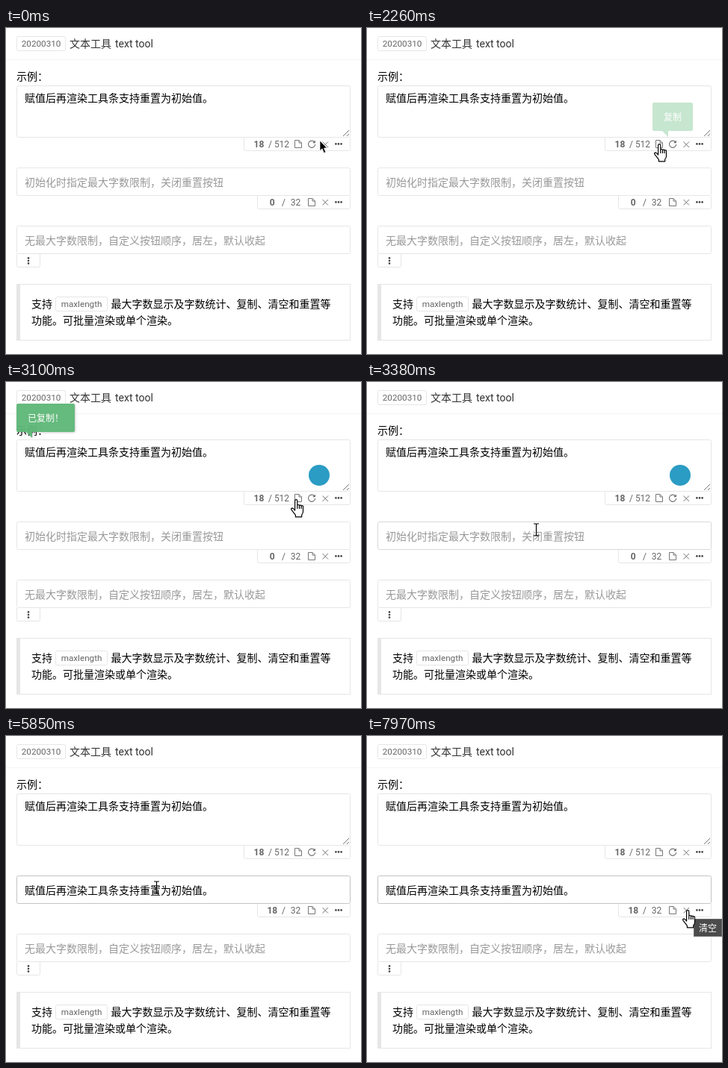
An HTML page that plays this animation: 475x437 px, repeating every 8 s.

```html
<!DOCTYPE html>
<html lang="zh-CN">
<head>
<meta charset="utf-8">
<title>文本工具</title>
<style>
html, body { margin: 0; width: 100%; height: 100%; overflow: hidden; background: #fff; }
svg { display: block; width: 475px; height: 437px; font: 14px "Noto Sans CJK SC", "Noto Sans CJK", sans-serif; }
.box { fill: none; stroke: #e6e6e6; }
.latin { font-family: Roboto, sans-serif; }
.tag { font: 11.7px Roboto, sans-serif; fill: #666; }
.num { font: 12px Roboto, sans-serif; fill: #666; text-anchor: middle; }
.bold { font-weight: 700; }
.hint { fill: #999; }
.small { font-size: 12px; fill: #fff; }
.icon { fill: none; stroke: #777; }
.dots { fill: #444; }
.tip { fill: #5fb878; }
.shade { filter: drop-shadow(1px 1px 1.5px rgba(0, 0, 0, .2)); }
</style>
</head>
<body>
<svg viewBox="0 0 475 437">
  <defs>
    <path id="file" class="icon" d="M.5.5H6L9.5 4V10.5H.5ZM6 .5V4H9.5"/>
    <g id="reset"><path class="icon" stroke-width="1.2" d="M8.8 3A4.6 4.6 0 1 0 9.7 6"/><path fill="#666" d="M9.8 .6V4.3H6.2Z"/></g>
    <path id="clear" class="icon" d="M.5.5L8 8M8 .5L.5 8"/>
    <g id="more" class="dots"><circle cx="1.4" cy="1.4" r="1.3"/><circle cx="5" cy="1.4" r="1.3"/><circle cx="8.6" cy="1.4" r="1.3"/></g>
    <path id="arrow" fill="#000" stroke="#fff" stroke-width=".7" d="M0 0V13.6L3.1 10.8 5.4 16.4 7.8 15.4 5.5 10H9.6Z"/>
    <path id="hand" fill="#fff" stroke="#000" stroke-width="1.2" stroke-linejoin="round" d="M5.6 2.2a1.6 1.6 0 0 1 3.2 0V8.4a1.4 1.4 0 0 1 2.7.4a1.4 1.4 0 0 1 2.6.7a1.3 1.3 0 0 1 2.4 1V16.5q0 2.6-1.8 4.4V23.8H6.4V21.4L1 14.4q-1-1.8.4-2.3q1.4-.3 2.6 1L5.6 15ZM8.8 8.4V13M11.5 9V13M14.1 9.6V13"/>
    <path id="beam" fill="none" stroke="#000" stroke-width="1.2" d="M-3.5-8H-1Q0-8 0-7Q0-8 1-8H3.5M0-7V7M-3.5 8H-1Q0 8 0 7Q0 8 1 8H3.5"/>
  </defs>
  <rect width="475" height="437" fill="#fff"/>

  <path stroke="#f5f5f5" d="M0 42.5H475"/>
  <rect class="box" x="14.5" y="11.5" width="65" height="19" rx="2"/>
  <text class="tag" x="20.8" y="25.4">20200310</text>
  <text x="85" y="26" fill="#333">文本工具 <tspan class="latin" x="146">text tool</tspan></text>
  <text x="14" y="70">示例：</text>

  <rect class="box" x="14.5" y="77.5" width="446" height="69" rx="2"/>
  <text x="25" y="99">赋值后再渲染工具条支持重置为初始值。</text>
  <path stroke="#777" d="M451 145L459 137M456 145L459 142"/>
  <path class="box" d="M318.5 147V162.5Q318.5 164.5 320.5 164.5H458.5Q460.5 164.5 460.5 162.5V147"/>
  <text class="num bold" x="338.5" y="160">18</text>
  <text class="num" x="353.5" y="160">/</text>
  <text class="num" x="369" y="160">512</text>
  <use href="#file" x="386" y="150"/>
  <use href="#reset" x="404" y="150"/>
  <use href="#clear" x="423" y="152"/>
  <use href="#more" x="440" y="154"/>

  <rect id="field" class="box" x="14.5" y="187.5" width="446" height="37" rx="2"/>
  <text id="value" x="25" y="212"></text>
  <path id="caret" stroke="#000" d="M0 198V215"/>
  <path class="box" d="M336.5 225V240.5Q336.5 242.5 338.5 242.5H458.5Q460.5 242.5 460.5 240.5V225"/>
  <text id="count" class="num bold" x="356.3" y="238"></text>
  <text class="num" x="371.5" y="238">/</text>
  <text class="num" x="387.5" y="238">32</text>
  <use href="#file" x="404" y="228"/>
  <use href="#clear" x="423" y="229.5"/>
  <use href="#more" x="440" y="232"/>

  <rect class="box" x="14.5" y="265.5" width="446" height="37" rx="2"/>
  <text class="hint" x="25" y="290">无最大字数限制，自定义按钮顺序，居左，默认收起</text>
  <path class="box" d="M14.5 303V318.5Q14.5 320.5 16.5 320.5H43.5Q45.5 320.5 45.5 318.5V303"/>
  <use href="#more" transform="translate(31.4 307) rotate(90)"/>

  <rect class="box" x="14.5" y="343.5" width="446" height="75"/>
  <rect x="14" y="343" width="5" height="76" fill="#e6e6e6"/>
  <text x="34" y="375">支持</text>
  <rect class="box" x="66.5" y="360.5" width="69" height="19" rx="2"/>
  <text class="tag" x="73.7" y="374.2">maxlength</text>
  <text x="140.5" y="375">最大字数显示及字数统计、复制、清空和重置等</text>
  <text x="34" y="397">功能。可批量渲染或单个渲染。</text>

  <g id="copyTip">
    <path class="tip" d="M384 100H434Q436 100 436 102V136Q436 138 434 138H403V146L395 138H384Q382 138 382 136V102Q382 100 384 100Z"/>
    <text class="small" x="397" y="123.5">复制</text>
  </g>
  <g id="doneTip">
    <path class="tip shade" d="M16 29H90Q92 29 92 31V65Q92 67 90 67H35V75L27 67H16Q14 67 14 65V31Q14 29 16 29Z"/>
    <text class="small" x="29" y="52.5">已复制！</text>
  </g>
  <circle id="badge" cx="419" cy="125" fill="#2b9cc4"/>
  <g id="title">
    <rect x="437.5" y="245.5" width="37" height="23" fill="#4b4b4b" stroke="#6b6b6b"/>
    <text class="small" x="444" y="261.5">清空</text>
  </g>
  <use id="cursor"/>
</svg>
<script>
const LOOP = 8000, BLINK = 530, FOCUS = 3650, PASTE = 5300;
const $ = id => document.getElementById(id);
const set = (id, attrs) => { for (const k in attrs) $(id).setAttribute(k, attrs[k]); };

// Each row: start time, then the values held until the next row.
const pointer = [
  [0, 'arrow', 420, 151], [150, 'arrow', 415, 151], [300, 'arrow', 409, 151], [430, 'arrow', 400, 151],
  [550, 'arrow', 392, 152], [690, 'arrow', 391, 153], [810, 'arrow', 390, 154], [1680, 'arrow', 390, 155],
  [2260, 'hand', 384, 155], [2940, 'hand', 382, 156], [3100, 'hand', 381, 157], [3250, 'arrow', 320, 174],
  [3380, 'beam', 226.5, 198], [3530, 'beam', 210, 203], [3650, 'beam', 200.5, 205], [4620, 'beam', 201, 204],
  [4750, 'beam', 201.5, 203], [6250, 'beam', 215, 202], [6370, 'beam', 277.5, 197], [6520, 'beam', 402.5, 221],
  [6670, 'hand', 407, 227], [6790, 'hand', 413, 228], [6940, 'hand', 419, 229], [7060, 'hand', 421, 229],
  [7330, 'hand', 421.5, 231], [7600, 'hand', 422, 233]
];
const copyFade = [[0, 0], [2260, .35], [2380, 0]];
const doneFade = [[0, 0], [2380, .5], [2500, .96], [3250, .4], [3380, 0]];
const badgeSize = [[0, 0], [2380, 9], [2500, 16], [2620, 15], [2780, 14.5], [3100, 14], [3650, 9], [3770, 4], [3890, 0]];
const border = [[0, '#e6e6e6'], [3250, '#dfdfdf'], [3380, '#d8d8d8'], [3650, '#cdcdcd'], [3890, '#c4c4c4']];
const titleFade = [[0, 0], [7330, .6], [7450, 1]];

const at = (rows, t) => rows.findLast(r => r[0] <= t).slice(1);

function draw(t) {
  const [shape, x, y] = at(pointer, t);
  set('cursor', { href: '#' + shape, x, y });
  set('copyTip', { opacity: at(copyFade, t)[0] });
  set('doneTip', { opacity: at(doneFade, t)[0] });
  set('badge', { r: at(badgeSize, t)[0] });
  set('title', { opacity: at(titleFade, t)[0] });
  $('field').style.stroke = at(border, t)[0];

  const pasted = t >= PASTE;
  $('value').textContent = pasted ? '赋值后再渲染工具条支持重置为初始值。' : '初始化时指定最大字数限制，关闭重置按钮';
  set('value', { class: pasted ? '' : 'hint' });
  $('count').textContent = t >= PASTE + 120 ? '18' : '0';

  const since = t - (pasted ? PASTE : FOCUS);
  const lit = since >= 0 && Math.floor(since / BLINK) % 2 === 0;
  set('caret', { opacity: lit ? 1 : 0, transform: `translate(${pasted ? 277.5 : 25.5} 0)` });
}

const start = performance.now();
function tick() {
  draw((performance.now() - start) % LOOP);
  requestAnimationFrame(tick);
}
tick();
</script>
</body>
</html>
```
